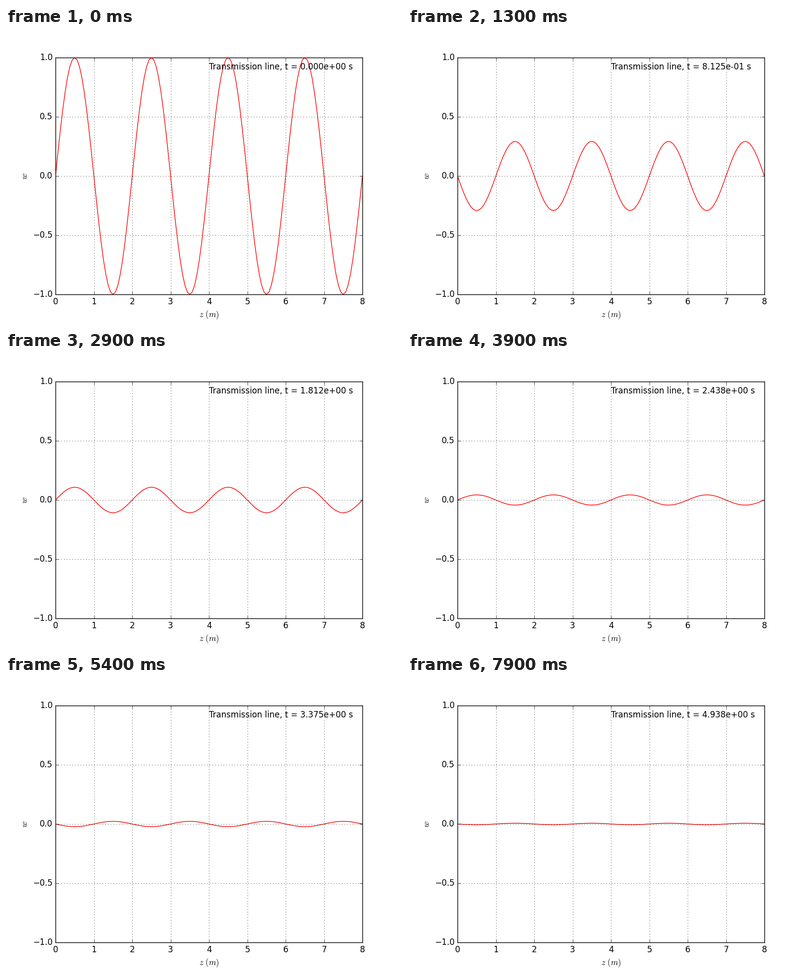
Recreate the animation shown at these times as a matplotlib script. Size 800 px wide and 600 px high, loop 8 s.

```python
import numpy as np
import matplotlib.pyplot as plt
from matplotlib.animation import FuncAnimation

plt.style.use("classic")

FRAMES, INTERVAL = 80, 100
LENGTH, STEP = 8, 1 / 16  # the same step in space and time


def solve(z):
    """Leapfrog solution of w_tt + 2 w_t + w = w_zz, starting at rest."""
    w = np.zeros((FRAMES, z.size))
    w[0] = np.sin(np.pi * z)

    def drive(v):
        out = np.zeros_like(v)
        out[1:-1] = v[2:] + v[:-2] - STEP**2 * v[1:-1]
        return out

    w[1] = drive(w[0]) / 2
    for n in range(1, FRAMES - 1):
        w[n + 1] = (drive(w[n]) - (1 - STEP) * w[n - 1]) / (1 + STEP)
    return w


z = np.linspace(0, LENGTH, int(LENGTH / STEP) + 1)
waves = solve(z)

fig = plt.figure(figsize=(8, 6), dpi=100, facecolor="white")
ax = fig.add_subplot(111)
ax.set_xlim(0, LENGTH)
ax.set_ylim(-1, 1)
ax.set_xticks(range(LENGTH + 1))
ax.set_yticks(np.linspace(-1, 1, 5))
ax.set_xlabel(r"$z\ (m)$")
ax.set_ylabel(r"$w$")
ax.grid(True)

line, = ax.plot(z, waves[0], "r")
label = ax.text(4, 0.9, "")


def update(n):
    line.set_ydata(waves[n])
    label.set_text(f"Transmission line, t = {n * STEP:.3e} s")
    return line, label


anim = FuncAnimation(fig, update, frames=FRAMES, interval=INTERVAL,
                     repeat=True, repeat_delay=0)
plt.show()
```
